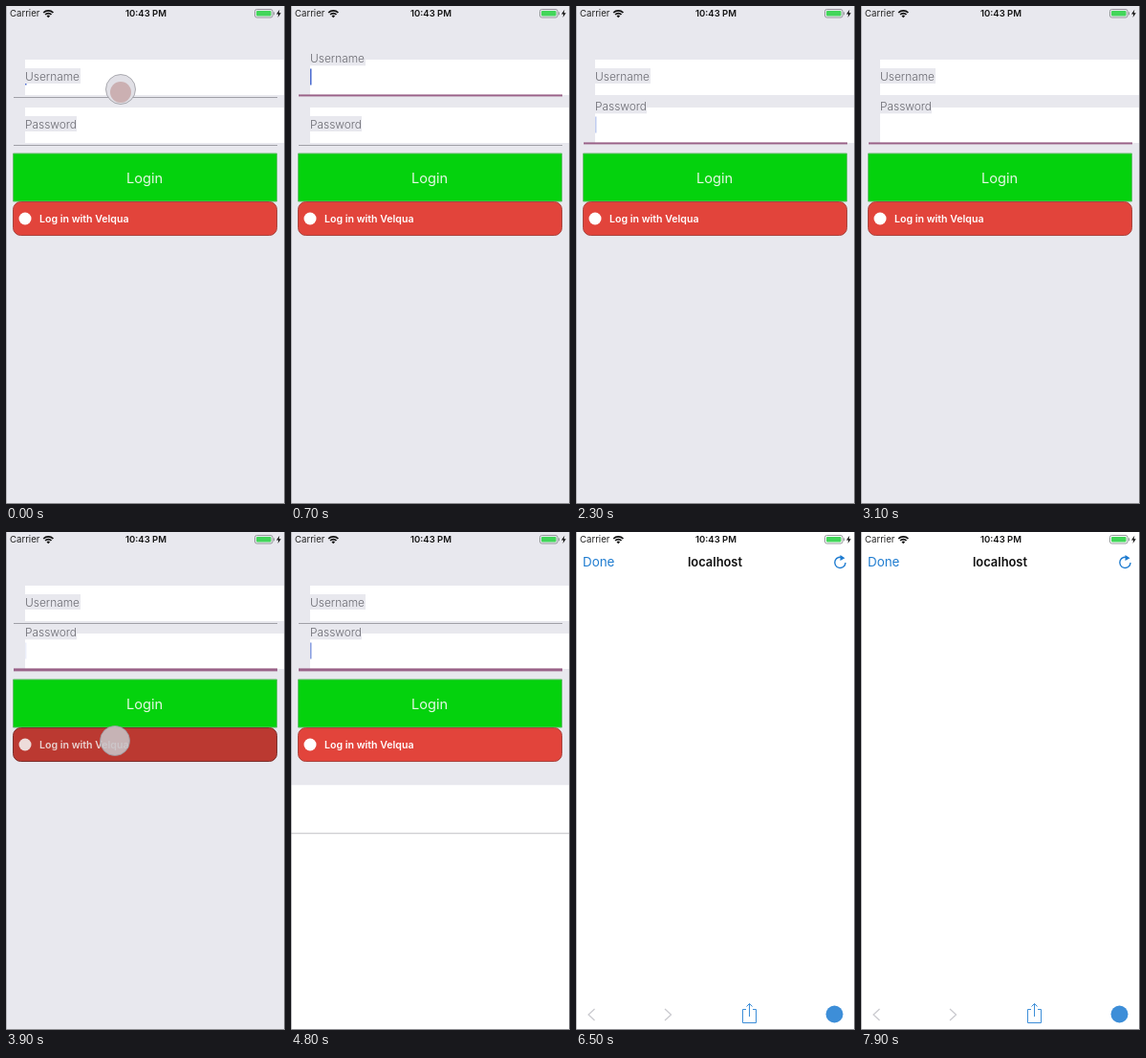
An HTML page with a canvas that plays this animation: 292 px wide and 520 px high, repeating every 8 s.

```html
<!DOCTYPE html>
<html lang="en">
<head>
<meta charset="utf-8">
<title>Login</title>
<style>
  html, body { margin: 0; width: 100%; height: 100%; overflow: hidden; background: #e8e8ee; }
  canvas { display: block; width: 292px; height: 520px; }
</style>
</head>
<body>
<canvas id="stage"></canvas>
<script>
const W = 292, H = 520, LOOP = 8000;
const BG = '#e8e8ee', BLUE = '#1f7cd0', ICON = '#3d8ed8', PURPLE = '#9a6288';
const canvas = document.getElementById('stage');
const ctx = canvas.getContext('2d');
const dpr = window.devicePixelRatio || 1;
canvas.width = W * dpr;
canvas.height = H * dpr;

// Timeline in ms
const FOCUS_PASSWORD = 1700, PRESS = [3700, 4150], MODAL = 4710.5;
const touches = [
  { from: 0, to: 150, x: 120, y: 87, fill: '#e1e0e6', core: '#cbb0b2' },
  { from: 1400, to: 1750, x: 115, y: 127, fill: '#e5e5ea' },
  { from: 3700, to: 4150, x: 114, y: 218, fill: 'rgba(199,196,199,.88)' }
];

const ramp = (t, from, to) => Math.min(1, Math.max(0, (t - from) / (to - from)));
const ease = p => p * p * (3 - 2 * p);

function rect(x, y, w, h, color) {
  ctx.fillStyle = color;
  ctx.fillRect(x, y, w, h);
}

function text(str, x, y, size, color, weight = 400, align = 'left') {
  ctx.font = `${weight} ${size}px Inter, sans-serif`;
  ctx.textAlign = align;
  ctx.textBaseline = 'alphabetic';
  ctx.fillStyle = color;
  ctx.fillText(str, x, y);
}

function disc(x, y, r, color) {
  ctx.beginPath();
  ctx.arc(x, y, r, 0, 2 * Math.PI);
  ctx.fillStyle = color;
  ctx.fill();
}

function stroke(path, color, width = 1) {
  ctx.strokeStyle = color;
  ctx.lineWidth = width;
  ctx.stroke(new Path2D(path));
}

function roundBox(x, y, w, h, r, fill, border) {
  ctx.beginPath();
  ctx.roundRect(x, y, w, h, r);
  if (fill) { ctx.fillStyle = fill; ctx.fill(); }
  if (border) { ctx.strokeStyle = border; ctx.lineWidth = 1; ctx.stroke(); }
}

function faded(alpha, draw) {
  ctx.save();
  ctx.globalAlpha *= alpha;
  draw();
  ctx.restore();
}

function caretAlpha(t, focusedAt) {
  if (t - focusedAt < 400) return 1;
  const p = t % 1000;
  return ramp(p, 250, 400) * (1 - ramp(p, 740, 920));
}

function field(label, top, lift, active, focusedAt, t) {
  rect(20, top, 271, 37, '#fff');
  if (active) faded(caretAlpha(t, focusedAt), () => rect(20, top + 9.5, 1.5, 17, '#4a6bd0'));
  const y = top + 9 - 18.7 * lift;
  rect(20, y, label === 'Username' ? 58 : 54, 16, BG);
  text(label, 20, y + 12.5, 11.9, '#6b6b72', 300);

  const lineY = top + 39;
  if (active && lift > 0) rect(8, lineY - 2.6, 276, t > PRESS[0] ? 3 : 2, PURPLE);
  else if (t < 1000 || t >= PRESS[0]) rect(8, lineY, 276, 1, '#a0a0a7');
}

function login(t) {
  rect(0, 0, W, H, BG);
  const toPassword = ease(ramp(t, FOCUS_PASSWORD, FOCUS_PASSWORD + 250));
  const onPassword = t >= FOCUS_PASSWORD;
  const nameLift = ease(ramp(t, 100, 350)) * (1 - toPassword);
  field('Username', 56, nameLift, !onPassword, 0, t);
  field('Password', 106, toPassword, onPassword, FOCUS_PASSWORD, t);

  roundBox(7.5, 154, 276, 50, 0, '#04d20d', '#62bd69');
  text('Login', 145, 185, 14.6, '#e6f8e6', 400, 'center');

  const pressed = t >= PRESS[0] && t < PRESS[1];
  roundBox(7.5, 204.5, 276, 35, 8, pressed ? '#bb3931' : '#e2443b', pressed ? '#7c302c' : '#a9443e');
  disc(20, 222, 6.5, pressed ? '#eddcda' : '#fff');
  text('Log in with Velqua', 35, 226, 10.6, pressed ? '#e9d3d1' : '#fff', 600);

  for (const { from, to, x, y, fill, core } of touches) {
    if (t < from || t >= to) continue;
    disc(x, y, 15.5, fill);
    ctx.strokeStyle = '#98989f';
    ctx.lineWidth = 0.8;
    ctx.stroke();
    if (core) disc(x, y + 3, 11, core);
  }
}

function toolbar() {
  stroke('M19.5 498 L13 504 L19.5 510 M93 498 L99.5 504 L93 510', '#c9c9ce', 1.2);
  stroke('M178 498.5 H174.5 V512.5 H188.5 V498.5 H185 M181.5 506 V492.5 M178.5 495.5 L181.5 492.5 L184.5 495.5', ICON);
  disc(270.5, 503.5, 9, ICON);
}

function browser(t) {
  if (t < MODAL) return;
  // Critically damped spring
  const k = (t - MODAL) * 0.01826;
  const offset = H * (1 + k) * Math.exp(-k);
  const lines = 1 - ramp(t, 5200, 5300);
  ctx.save();
  ctx.translate(0, t < 5190 ? offset : 0);
  rect(0, 0, W, H, '#fff');
  faded(lines, () => rect(0, 50, W, 1, '#c2c2c6'));

  faded(ramp(t, 4900, 5100), () => {
    text('Done', 7, 36, 13.4, BLUE);
    text('localhost', 145.5, 35.5, 12.9, '#111', 600, 'center');
    stroke('M279.5 27.2 A5.6 5.6 0 1 0 282 31.9', BLUE, 1.4);
    ctx.fillStyle = BLUE;
    ctx.fill(new Path2D('M276.5 24 L281.5 27.3 L276.5 30 Z'));
    faded(lines, () => rect(0, 485, W, 1, '#c2c2c6'));
  });
  faded(ramp(t, 4950, 5400), toolbar);
  ctx.restore();
}

function statusBar() {
  text('Carrier', 4, 11.3, 9.6, '#222');
  stroke('M39.2 7 A7 7 0 0 1 49.4 7 M41.1 9 A4.4 4.4 0 0 1 47.5 9', '#111', 1.7);
  ctx.fillStyle = '#111';
  ctx.fill(new Path2D('M44.3 12.2 L42.5 10.4 A2.5 2.5 0 0 1 46.1 10.4 Z'));
  text('10:43 PM', 146.5, 11.3, 9.5, '#111', 600, 'center');
  roundBox(260.5, 3.5, 18.5, 8.5, 2, null, '#96969c');
  roundBox(262, 5, 15.5, 5.5, 1, '#42d65a');
  rect(280, 6.3, 1, 3, '#96969c');
  ctx.fillStyle = '#111';
  ctx.fill(new Path2D('M286.3 3.8 L283 8.4 H285.2 L284.5 12 L287.8 7.2 H285.6 Z'));
}

function frameEdge() {
  rect(0, 0, 0.5, H, '#8a8a8e');
  rect(W - 1, 0, 1, H, '#77777b');
  rect(0, H - 1, W, 1, '#8a8a8e');
}

function render(now) {
  const t = now % LOOP;
  ctx.setTransform(dpr, 0, 0, dpr, 0, 0);
  login(t);
  browser(t);
  statusBar();
  frameEdge();
  requestAnimationFrame(render);
}
requestAnimationFrame(render);
</script>
</body>
</html>
```
